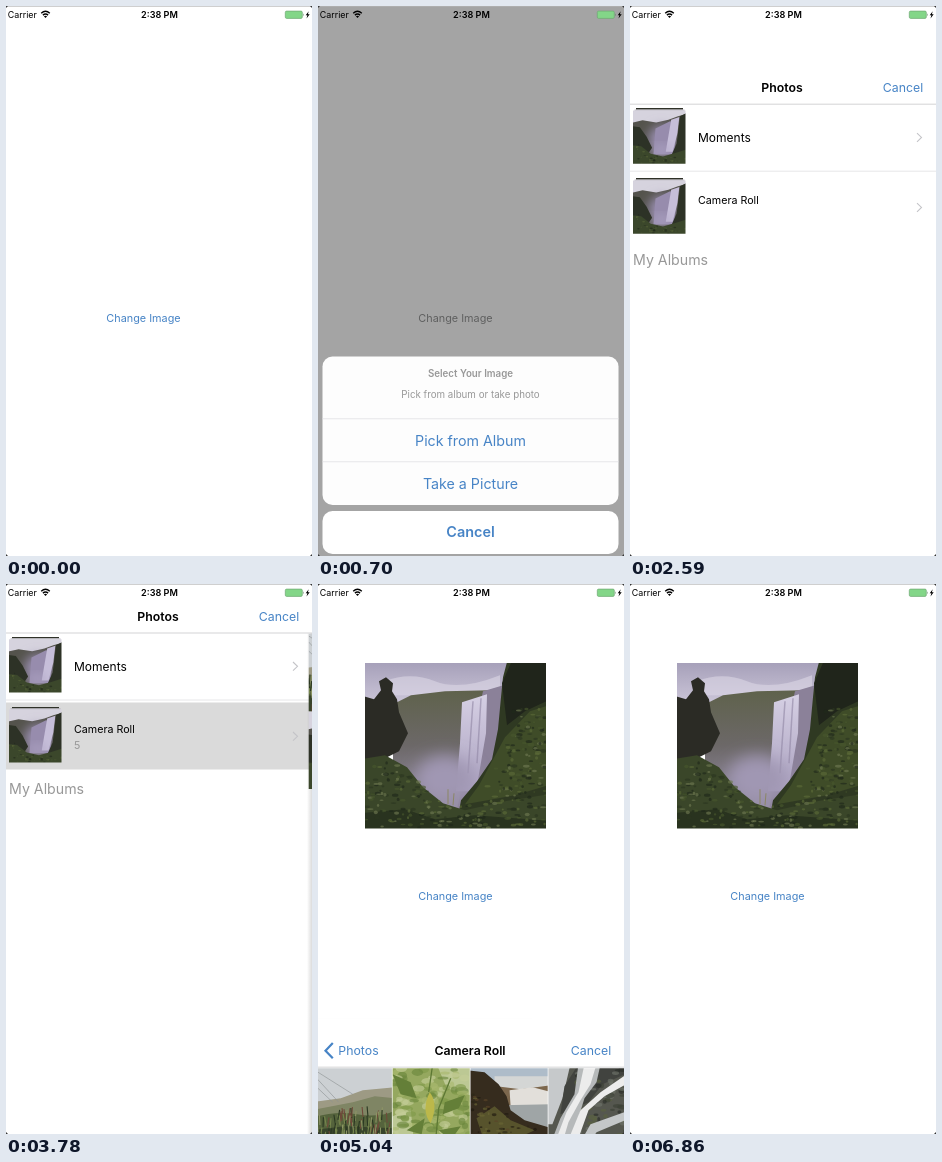
These frames come from a looping animation (306 px wide and 550 px high, 7140 ms). An HTML page:

```html
<!DOCTYPE html>
<html lang="en">
<head>
<meta charset="utf-8">
<title>Image picker</title>
<style>
  html, body { margin: 0; width: 100%; height: 100%; overflow: hidden; background: #fff; }
  svg.stage { display: block; width: 100vw; height: 100vh; }
  text { font-family: Inter, Roboto, "Liberation Sans", sans-serif; }
  .mid { text-anchor: middle; }
  .bold { font-weight: 600; }
  .blue { fill: #4784c6; }
  .nav { font-size: 12.3px; }
  .grey { fill: #989898; }
  .line { stroke: #e0e0e3; stroke-width: .8; }
  .arrow { fill: none; stroke: #c4c4c8; stroke-width: 1.1; }
</style>
</head>
<body>
<svg class="stage" viewBox="0 0 306 550" preserveAspectRatio="none">
  <defs>
    <filter id="soft" x="-10%" y="-10%" width="120%" height="120%"><feGaussianBlur stdDeviation=".7"/></filter>
    <filter id="haze" x="-60%" y="-60%" width="220%" height="220%"><feGaussianBlur stdDeviation="8"/></filter>
    <linearGradient id="sky" x2="0" y2="1">
      <stop offset="0" stop-color="#a29cb6"/><stop offset="1" stop-color="#d0cadc"/>
    </linearGradient>
    <linearGradient id="hill" x2="0" y2="1">
      <stop offset="0" stop-color="#5f624c"/><stop offset=".45" stop-color="#6c6868"/>
      <stop offset="1" stop-color="#9a91ab"/>
    </linearGradient>
    <linearGradient id="water" x2="0" y2="1">
      <stop offset="0" stop-color="#d6d0e4"/><stop offset="1" stop-color="#aaa1bf"/>
    </linearGradient>
    <linearGradient id="edge">
      <stop offset="0" stop-opacity="0"/><stop offset="1" stop-opacity=".14"/>
    </linearGradient>

    <symbol id="valley" viewBox="0 0 181 165">
      <g filter="url(#soft)">
        <path fill="url(#sky)" d="M-5-5H190V45H-5z"/>
        <path fill="#ddd8e6" d="M20 18Q45 8 70 18T135 12V32H20z" opacity=".6"/>
        <path fill="url(#hill)" d="M28 41L46 32 80 28 125 27V150H28z"/>
        <path fill="#8b8199" d="M118 28L145 20V110L100 146H92z"/>
        <path fill="url(#water)" d="M97 39L122 31 121 70 111 128H91L95 80z"/>
        <path fill="none" stroke="#8f86a4" stroke-width="1.500" opacity=".6" d="M108 38L103 110M116 35L112 100"/>
        <ellipse cx="80" cy="116" rx="30" ry="24" fill="#a097b3" filter="url(#haze)"/>
        <path fill="#2b2b25" d="M-5 32L9 36 16 27 14 18 21 14 28 20 27 28 32 36 34 49 43 70 34 88 10 100H-5z"/>
        <path fill="#2f3922" d="M136 34L138 14 143-5H190V170H90L96 137 112 118 127 96 133 66z"/>
        <path fill="#3f4c28" d="M140 74L165 48 190 40V120L150 132 100 141 114 122z"/>
        <path fill="#20251b" d="M137 20L148-5H190V34L160 48 142 62z"/>
        <path fill="#3a4629" d="M-5 96L20 92 42 104 58 124 78 140 100 147 140 138 190 130V170H-5z"/>
        <path fill="#29331f" d="M-5 150L40 146 70 156 110 152 190 158V170H-5z"/>
        <g id="leaves"></g>
        <path fill="none" stroke="#8b8765" d="M83 141V126M88 142L89 130"/>
      </g>
    </symbol>

    <symbol id="fall" viewBox="0 0 77 77">
      <g filter="url(#soft)">
        <path fill="#d6d3de" d="M-4-4H81V81H-4z"/>
        <path fill="#54534c" d="M-4 18L14 14 34 17 52 13 66 8 81 4V81H-4z"/>
        <ellipse cx="42" cy="42" rx="19" ry="20" fill="#9b90b3" filter="url(#haze)"/>
        <path fill="#978cad" d="M33 26L55 15 63 40 60 64 30 64z"/>
        <path fill="#c6bed9" d="M56 13L68 9 65 34 58 60 48 60z"/>
        <ellipse cx="42" cy="58" rx="14" ry="6" fill="#aea4c4" filter="url(#haze)"/>
        <path fill="#2d3226" d="M-4 22L10 24 20 38 28 54 20 66H-4zM69 8L81 2V62L56 66 64 48z"/>
        <path fill="#3b472b" d="M-4 50L12 52 26 63 44 67 62 62 81 56V81H-4z"/>
        <g id="moss"></g>
      </g>
    </symbol>

    <symbol id="meadow" viewBox="0 0 77 77">
      <g filter="url(#soft)">
        <path fill="#ccd0d3" d="M-4-4H81V81H-4z"/>
        <path fill="#9d9a84" d="M-4 34L26 30 48 22 81 19V60H-4z"/>
        <path fill="#7f8564" d="M-4 42L38 34 60 28 81 30V60H-4z"/>
        <path fill="#55633c" d="M-4 50Q20 42 42 46T81 42V81H-4z"/>
        <path fill="#38442b" d="M-4 62L30 58 81 60V81H-4z"/>
        <g id="blades"></g>
      </g>
      <path fill="none" stroke="#8c9092" stroke-width=".6" d="M0 8L24 34M0 17L18 34M0 2L38 26"/>
    </symbol>

    <symbol id="plant" viewBox="0 0 77 77">
      <g filter="url(#soft)">
        <path fill="#95a85f" d="M-4-4H81V81H-4z"/>
        <path fill="#bcc894" d="M44-4H81V28L54 20zM-4 50L18 40 22 81H-4z"/>
        <g id="foliage"></g>
        <path fill="#647f38" d="M0 6L18 14 24 30 8 26zM52 34L72 27 66 40 50 46zM14 62L32 50 29 66zM46 62L68 58 58 72z"/>
        <path fill="#bcb84a" d="M37 24Q46 35 38 55 28 42 37 24z"/>
        <path fill="none" stroke="#5d7834" stroke-width="1.300" d="M40-4L36 24M42 81L46 40 58 10"/>
      </g>
    </symbol>

    <symbol id="river" viewBox="0 0 77 77">
      <g filter="url(#soft)">
        <path fill="#aebcc9" d="M-4-4H81V81H-4z"/>
        <path fill="#d4d6d5" d="M24 8H81V24H24z"/>
        <path fill="#7c674d" d="M26 18L50 21 81 17V42H26z"/>
        <path fill="#e2dfda" d="M39 22L62 19 81 24V40L40 38z"/>
        <path fill="#9fa5a6" d="M30 37L81 36V62H30z"/>
        <path fill="#362c1e" d="M-4 2L14 4 28 16 36 28 40 42 54 52 81 60V81H-4z"/>
        <path fill="#57532c" d="M6 50L24 38 40 52 64 62 42 72 12 68z"/>
        <g id="stones"></g>
      </g>
    </symbol>

    <symbol id="stream" viewBox="0 0 77 77">
      <g filter="url(#soft)">
        <path fill="#55574f" d="M-4-4H81V81H-4z"/>
        <path fill="#c6c9cb" d="M-4-4H22L14 30 4 56H-4z"/>
        <path fill="#41433f" d="M16 18L30-4H81V4L54 16 40 34 12 46z"/>
        <g id="pebbles"></g>
        <path fill="#b6b9ba" d="M30-4H52L48 14 36 30 20 81H0L12 50 26 26z"/>
        <path fill="#ececec" d="M36-4H48L42 16 32 32 20 54 12 81H4L18 44 30 24zM81 4V14L56 28 40 42 26 81H16L32 42 52 24z"/>
        <path fill="#c4c7c8" d="M42 56L81 42V50L48 64 36 81H28z"/>
      </g>
    </symbol>

    <g id="album">
      <path stroke="#2f3128" stroke-width="1.400" d="M6 53.600H53"/>
      <path stroke="#96919f" stroke-width=".8" d="M4.500 55H54.500"/>
      <use href="#fall" x="3" y="55.300" width="52.500" height="53.200" preserveAspectRatio="none"/>
      <path class="arrow" d="M287 78L291.500 82.300 287 86.600"/>
    </g>
  </defs>

  <rect width="306" height="550" fill="#fff"/>
  <use id="picked" href="#valley" x="47" y="79" width="181" height="165.500"/>
  <text id="change" class="mid" x="137.500" y="316.300" font-size="10.850">Change Image</text>
  <rect id="dim" width="306" height="550" opacity="0"/>

  <g id="sheet">
    <rect x="4.500" y="348.500" width="296" height="148.500" rx="10" fill="#fdfdfd"/>
    <rect x="4.500" y="503" width="296" height="43" rx="10" fill="#fff"/>
    <path class="line" d="M4.500 410.800H300.500M4.500 453.800H300.500"/>
    <text class="mid bold grey" x="152.500" y="368.800" font-size="9.750">Select Your Image</text>
    <text class="mid grey" x="152.500" y="389.900" font-size="9.750">Pick from album or take photo</text>
    <text class="mid blue" x="152.500" y="438" font-size="14.250">Pick from Album</text>
    <text class="mid blue" x="152.500" y="481" font-size="14.250">Take a Picture</text>
    <text class="mid blue bold" x="152.500" y="529.400" font-size="14.400">Cancel</text>
  </g>

  <g id="modal">
    <rect width="306" height="550" fill="#fff"/>
    <g id="list">
      <rect width="306" height="550" fill="#fff"/>
      <rect id="pressed" y="118.500" width="306" height="67" fill="#dadada"/>
      <use href="#album"/>
      <use href="#album" y="70"/>
      <path class="line" d="M0 116H306"/>
      <text x="68" y="86.600" font-size="12">Moments</text>
      <text x="68" y="149" font-size="10.700">Camera Roll</text>
      <text id="count" class="grey" x="68" y="164.800" font-size="10.700">5</text>
      <text class="grey" x="3" y="209.500" font-size="14.200">My Albums</text>
      <rect id="shade" width="306" height="550" opacity="0"/>
    </g>
    <g id="roll">
      <rect id="shadow" x="-5" width="5" height="550" fill="url(#edge)"/>
      <rect width="306" height="550" fill="#fff"/>
      <g id="grid"></g>
    </g>
    <rect width="306" height="49" fill="#fff"/>
    <path stroke="#c8c8cb" stroke-width=".8" d="M0 49H306"/>
    <text id="titleOld" class="mid bold nav" y="37">Photos</text>
    <text id="titleNew" class="mid bold nav" y="37">Camera Roll</text>
    <text id="backText" class="mid nav blue" y="37">Photos</text>
    <path id="backArrow" fill="none" stroke="#4784c6" stroke-width="2.200" d="M14.800 24.800L7.500 32.500 14.800 40.200"/>
    <text class="mid nav blue" x="273" y="37">Cancel</text>
  </g>

  <g>
    <text x="1.800" y="12" font-size="8.900">Carrier</text>
    <path fill="none" stroke="#000" stroke-width="1.400" d="M35.200 7.200Q39.500 3.400 43.800 7.200M36.900 9.100Q39.500 6.900 42.100 9.100"/>
    <path d="M37.900 10.300Q39.500 9.200 41.100 10.300L39.500 12z"/>
    <text class="mid bold" x="153.500" y="12.200" font-size="9.150">2:38 PM</text>
    <rect x="279.300" y="5.100" width="17" height="7.300" rx="1.300" fill="#83d688" stroke="#6fa873" stroke-width=".7"/>
    <path fill="#5d7d60" d="M297 7.300Q298.300 8.700 297 10.200z"/>
    <path d="M302.700 5.200L299.700 9.300H301.400L300.500 12.500 303.700 8.200H301.900z"/>
  </g>
  <path fill="none" stroke="#b4b4b4" stroke-width=".8" d="M0 .3H306"/>
  <path fill="#333" d="M0 0H2L0 2zM306 0V2L304 0zM0 550V548L2 550zM306 550H304L306 548z"/>
</svg>

<script>
const LOOP = 7140, STEP = 70, W = 306, H = 550;
const $ = id => document.getElementById(id);
const set = (id, attrs) => {
  for (const k in attrs) $(id).setAttribute(k, attrs[k]);
};
const add = (id, tag, attrs) => {
  const el = document.createElementNS("http://www.w3.org/2000/svg", tag);
  for (const k in attrs) el.setAttribute(k, attrs[k]);
  $(id).appendChild(el);
};
const mix = (a, b, p) => a + (b - a) * p;
const show = (id, on) => set(id, { visibility: on ? "visible" : "hidden" });

// Critically damped spring from 0 to 1; rate is per second.
const spring = (t, start, rate) => {
  const x = Math.max(0, t - start) / 1000 * rate;
  return 1 - (1 + x) * Math.exp(-x);
};

let seed = 11;
const rnd = () => (seed = seed * 16807 % 2147483647) / 2147483647;

// Speckles a w by h scene wherever inside(x, y) holds.
function scatter(id, n, w, h, size, colors, inside) {
  for (let i = 0; i < n; i++) {
    const x = rnd() * w, y = rnd() * h;
    const rx = size * (.4 + rnd()), ry = size * (.3 + rnd() * .5);
    if (!inside(x, y)) continue;
    add(id, "ellipse", { cx: x, cy: y, rx, ry, fill: colors[i % colors.length], opacity: .65 });
  }
}

function addTexture() {
  scatter("leaves", 900, 181, 165, 2.4, ["#5a6a38", "#1f281a", "#47562c", "#2b3520", "#6d7850"], (x, y) =>
    y > (x < 95 ? 98 + Math.max(0, x - 28) * .8 : 142) ||
    x > 142 && y > 45 || x > 130 && y > 100 || x > 116 && y > 122);
  scatter("moss", 160, 77, 77, 1.6, ["#566338", "#222a1c", "#465331"], (x, y) =>
    y > 66 || x < 20 && y > 40 + x);
  scatter("foliage", 120, 77, 77, 5, ["#7f9a49", "#a9b96f", "#6b873d", "#c3cd97"], () => true);
  scatter("stones", 160, 77, 77, 2, ["#6a6534", "#1f180f", "#5a4428", "#2d2617"], (x, y) =>
    y > 22 + x * .6 && y > 10);
  scatter("pebbles", 90, 77, 77, 3.5, ["#2a2c28", "#6f736a", "#5a6340", "#3c4136"], (x, y) => x > 30 - y * .1);
  for (let i = 0; i < 110; i++) {
    const x = rnd() * 77, y = 42 + rnd() * 34;
    add("blades", "path", {
      d: `M${x} ${y + 6}L${x + rnd() * 4 - 2} ${y - 4}`,
      stroke: ["#75854c", "#6f4a3a", "#2b3822", "#8c9464"][i % 4], "stroke-width": 1.1
    });
  }
}

function fillGrid() {
  ["meadow", "plant", "river", "stream", "fall"].forEach((name, i) => {
    add("grid", "use", {
      href: "#" + name, x: i % 4 * 77.9 - 3.3, y: 50 + Math.floor(i / 4) * 77.9,
      width: 77.2, height: 77.2, preserveAspectRatio: "none"
    });
  });
}

function draw(t) {
  const sheet = spring(t, 255, 15) - spring(t, 1590, 16);
  const up = spring(t, 2390, 20.15), down = spring(t, 4860, 16.25);
  const push = spring(t, 3780, 23.4);

  const tint = [71, 132, 198].map(c => Math.round(mix(c, 148, sheet)));
  set("change", { fill: `rgb(${tint})` });
  set("dim", { opacity: .36 * sheet });
  set("sheet", { transform: `translate(0 ${205 * (1 - sheet)})` });
  show("sheet", sheet > .005);
  show("picked", t >= 4760);

  const open = t >= 2390 && t < 5180;
  set("modal", { display: open ? "inline" : "none" });
  if (!open) return;

  set("modal", { transform: `translate(0 ${H * (1 - up + down)})` });
  set("count", { opacity: +(t >= 2660) });
  set("pressed", { opacity: +(t >= 3640) });
  set("list", { transform: `translate(${-92 * push} 0)` });
  set("shade", { opacity: .1 * push });
  set("roll", { transform: `translate(${W * (1 - push)} 0)`, opacity: +(t >= 3780) });
  set("shadow", { opacity: 1 - push });

  const backX = mix(152, 40.5, push);
  set("titleOld", { x: backX, opacity: 1 - push });
  set("backText", { x: backX, opacity: push });
  set("backArrow", { opacity: push });
  set("titleNew", { x: mix(290, 152, push), opacity: push });
}

addTexture();
fillGrid();

const began = performance.now();
function tick() {
  const t = (performance.now() - began) % LOOP;
  draw(Math.floor(t / STEP) * STEP); // the screen advances in 70 ms steps
  requestAnimationFrame(tick);
}
draw(0);
requestAnimationFrame(tick);
</script>
</body>
</html>
```
